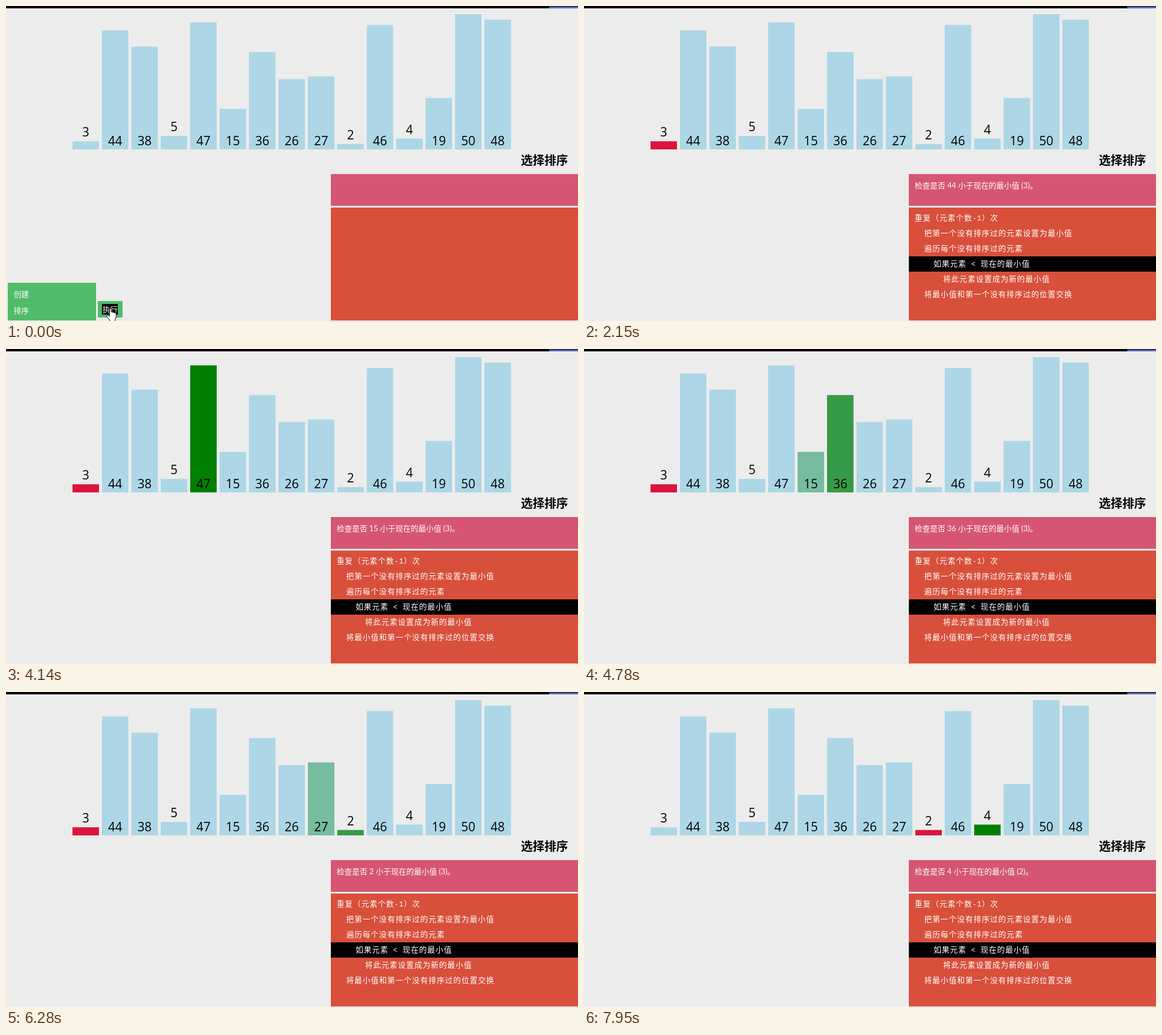
These frames come from a looping animation (972 by 536 pixels, 7990 ms). An HTML page:

```html
<!DOCTYPE html>
<html lang="zh-CN">
<head>
<meta charset="utf-8">
<title>选择排序</title>
<style>
  html, body { margin: 0; width: 100%; height: 100%; overflow: hidden; background: #ececec; }
  svg { display: block; width: 972px; height: 536px; }
  text { font: 13px 'Noto Sans CJK SC', 'Noto Sans CJK', sans-serif; fill: #fff; white-space: pre; }
  .value { font: 21px 'Open Sans', 'Noto Sans', sans-serif; fill: #000; text-anchor: middle; }
  .title { font-size: 20px; font-weight: 700; fill: #000; }
  .status { font-family: Lato, 'Noto Sans CJK SC', 'Noto Sans CJK', sans-serif; }
  .code { letter-spacing: 1px; }
  .latin { font: 12px 'Liberation Mono', monospace; letter-spacing: 0.8px; }
</style>
</head>
<body>
<svg id="stage" viewBox="0 0 972 536">
  <rect width="972" height="536" fill="#ececec"/>
  <rect width="972" height="4" fill="#000"/>
  <rect x="923" y="1" width="49" height="3" fill="#5b63b5"/>
  <g id="bars"></g>
  <text class="title" x="875" y="269.5">选择排序</text>
  <rect x="552" y="286" width="420" height="54" fill="#d65573"/>
  <text id="status" class="status" x="562" y="310"></text>
  <rect x="552" y="343" width="420" height="192" fill="#d84f3b"/>
  <g id="marks"></g>
  <g id="code"></g>
  <clipPath id="menuClip"><rect id="menuEdge" x="3" y="471" width="150" height="64"/></clipPath>
  <g id="menu" clip-path="url(#menuClip)">
    <rect x="3" y="471" width="150" height="64" fill="#50bb68"/>
    <text x="13" y="495">创建</text>
    <text x="13" y="523">排序</text>
  </g>
  <g id="run">
    <rect x="156" y="502" width="42" height="28" fill="#50bb68"/>
    <rect x="163" y="507" width="27" height="18" fill="#000"/>
    <text x="164" y="521">执行</text>
  </g>
  <path id="hand" fill="#fff" stroke="#000" stroke-linejoin="round"
    d="M176 526V515.5q1.5-2.5 3 0V521q1.5-1.5 3 .5q1.5-1 2.5.8q2-.8 2.7 1.2V530l-2 4V537H176.500V535L170.500 527.500q0-2.500 2.500-1.500L176 528Z"/>
</svg>
<script>
const LOOP = 7990, FADE = 300;
const HIDE_AT = 650, HIDE_TIME = 400;
const VALUES = [3, 44, 38, 5, 47, 15, 36, 26, 27, 2, 46, 4, 19, 50, 48];
const BLUE = [173, 215, 230], GREEN = [0, 128, 0], RED = [220, 20, 60];
const FLOOR = 244, UNIT = 4.6, ROW = 26;

const LINES = [
  [0, '重复（元素个数-1）次'],
  [1, '把第一个没有排序过的元素设置为最小值'],
  [1, '遍历每个没有排序过的元素'],
  [2, '如果元素 < 现在的最小值'],
  [3, '将此元素设置成为新的最小值'],
  [1, '将最小值和第一个没有排序过的位置交换']
];

const check = (at, cur, min = 0) => ({
  at, cur, min, rows: [3],
  text: `检查是否 ${VALUES[cur]} 小于现在的最小值 (${VALUES[min]})。`
});

const STEPS = [
  { at: 0, cur: -1, min: -1, rows: [], text: '' },
  { at: 1640, cur: -1, min: 0, rows: [1, 2], text: '将 3 设置为目前最小值，然后遍历余下未排序的元素。' },
  ...[2125, 2590, 3108, 3630, 4122, 4609, 5125, 5615, 6109].map((at, i) => check(at, i + 1)),
  { at: 6630, cur: -1, min: 9, rows: [4], text: '将 2 设置为新的最小值。' },
  check(7125, 10, 9),
  check(7610, 11, 9)
];

const $ = id => document.getElementById(id);

function add(parent, tag, attrs, text = '') {
  const el = document.createElementNS('http://www.w3.org/2000/svg', tag);
  for (const key in attrs) el.setAttribute(key, attrs[key]);
  el.textContent = text;
  return parent.appendChild(el);
}

const bars = VALUES.map((v, i) => {
  const x = 113 + 50 * i, top = FLOOR - v * UNIT;
  const bar = add($('bars'), 'rect', { x, y: top, width: 45, height: v * UNIT });
  add($('bars'), 'text', { class: 'value', x: x + 22.5, y: v < 10 ? top - 8 : 236.5 }, v);
  return bar;
});

const marks = LINES.map(([indent, line], i) => {
  const text = add($('code'), 'text', { class: 'code', x: 562 + 16 * indent, y: 365 + ROW * i });
  line.split(/([ -~]+)/).forEach((part, k) => add(text, 'tspan', k % 2 ? { class: 'latin' } : {}, part));
  return add($('marks'), 'rect', { x: 552, y: 348 + ROW * i, width: 420, height: ROW });
});

const clamp = p => Math.max(0, Math.min(1, p));
const cubic = p => p < 0.5 ? 4 * p ** 3 : 1 - 4 * (1 - p) ** 3;
const swing = p => 0.5 - Math.cos(p * Math.PI) / 2;
const show = (el, on) => { el.style.display = on ? '' : 'none'; };
const colour = (step, i) => i === step.min ? RED : i === step.cur ? GREEN : BLUE;

function draw(t) {
  const n = STEPS.findLastIndex(s => s.at <= t);
  const step = STEPS[n], last = STEPS[Math.max(0, n - 1)];
  const p = cubic(clamp((t - step.at) / FADE));

  bars.forEach((bar, i) => {
    const from = colour(last, i), to = colour(step, i);
    bar.setAttribute('fill', `rgb(${from.map((c, k) => Math.round(c + (to[k] - c) * p))})`);
  });
  marks.forEach((mark, i) => show(mark, step.rows.includes(i)));
  if ($('status').textContent !== step.text) $('status').textContent = step.text;

  const hide = clamp((t - HIDE_AT) / HIDE_TIME);
  show($('code'), t >= HIDE_AT);
  show($('hand'), t < HIDE_AT);
  show($('menu'), hide < 1);
  $('menuEdge').setAttribute('width', 150 * (1 - swing(hide)));
  $('run').style.opacity = 1 - clamp(hide * 4);
}

const start = performance.now();
function tick() {
  draw((performance.now() - start) % LOOP);
  requestAnimationFrame(tick);
}
tick();
</script>
</body>
</html>
```
